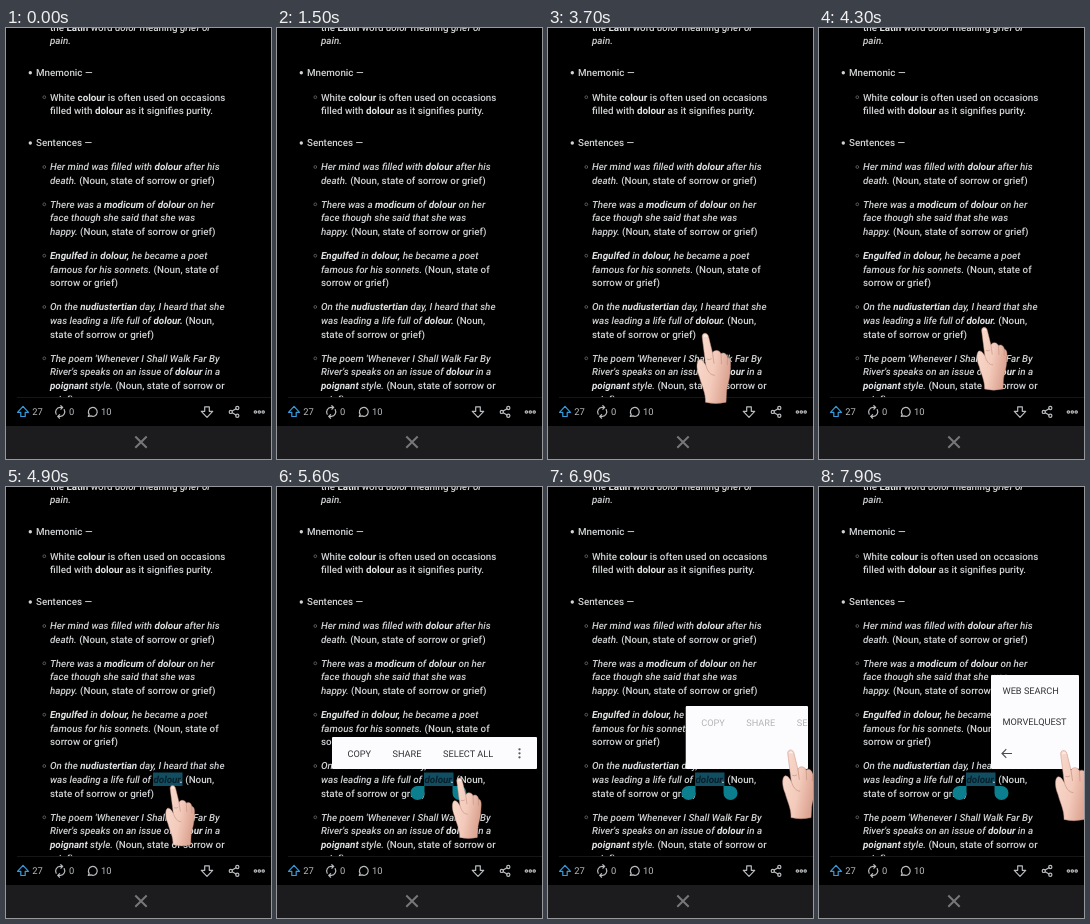
Animation of 265 by 431 pixels, one loop 8 s. Source, as an HTML page:

```html
<!DOCTYPE html>
<html lang="en">
<head>
<meta charset="utf-8">
<title>Text selection menu</title>
<style>
  html, body { margin: 0; width: 100%; height: 100%; overflow: hidden; background: #000; }
  svg { display: block; width: 100vw; height: 100vh; }
  text { font-family: Roboto, "Noto Sans", sans-serif; text-rendering: geometricPrecision; white-space: pre; }
  #page text { font-size: 9.8px; font-weight: 500; fill: #cfd1d3; }
  #page .bold { font-weight: 700; fill: #e0e2e4; }
  #page .italic { font-style: italic; }
  .icon { fill: none; stroke: #b9bcbf; stroke-width: 1.2; stroke-linejoin: round; stroke-linecap: round; }
  .count { font-size: 9.4px; fill: #b9bcbf; }
  #popup text { font-size: 9.2px; fill: #303134; }
</style>
</head>
<body>
<svg viewBox="0 0 265 431" preserveAspectRatio="none">
  <defs>
    <linearGradient id="skin" x1="0" x2="1" y1="0" y2=".4">
      <stop offset="0" stop-color="#f9dccf"/>
      <stop offset=".6" stop-color="#f3cabb"/>
      <stop offset="1" stop-color="#dda593"/>
    </linearGradient>
    <clipPath id="popupClip"><rect id="clipBox" rx="1"/></clipPath>
  </defs>
  <rect width="265" height="431"/>
  <rect id="selection" x="147" y="285.5" width="29.5" height="13.5" fill="#114e62"/>
  <g id="page"></g>

  <rect y="369.5" width="265" height="29"/>
  <path d="M11 369.5H265" stroke="#1b1c1d" stroke-width=".8"/>
  <path class="icon" style="stroke:#359bdc" d="M17 378.3L22.5 384.3H19.2V388.5H14.8V384.3H11.5Z"/>
  <text class="count" x="26.3" y="387">27</text>
  <g class="icon">
    <path d="M50.2 386.2A4.6 4.6 0 0 1 54 379.4H56.6M54.8 377.6L56.7 379.4L54.8 381.2"/>
    <path d="M58.2 381.6A4.6 4.6 0 0 1 54.4 388.4H51.8M53.6 386.6L51.7 388.4L53.6 390.2"/>
    <path d="M82.3 388.3L83.2 386.4A4.4 4.4 0 1 1 85 387.9Z"/>
    <path d="M201 389.3L195.3 383.3H198.7V378.8H203.3V383.3H206.7Z"/>
    <path d="M226.2 383L230 380.7M226.2 384.8L230 387"/>
    <circle cx="224.8" cy="383.9" r="1.6"/><circle cx="231.3" cy="380" r="1.6"/><circle cx="231.3" cy="387.8" r="1.6"/>
    <circle cx="249.4" cy="384" r="1.2"/><circle cx="253.3" cy="384" r="1.2"/><circle cx="257.2" cy="384" r="1.2"/>
  </g>
  <text class="count" x="63" y="387">0</text>
  <text class="count" x="95" y="387">10</text>

  <rect y="398" width="265" height="33" fill="#1c1b1e"/>
  <path d="M129.3 408.5L140.7 419.7M140.7 408.5L129.3 419.7" stroke="#77767a" stroke-width="2"/>

  <g id="handles" fill="#0c7f8f">
    <path d="M147.5 299V306A7 7 0 1 1 140.5 299Z"/>
    <path d="M175.5 299V306A7 7 0 1 0 182.5 299Z"/>
  </g>

  <g id="popup" clip-path="url(#popupClip)">
    <rect width="265" height="431" fill="#fcfbfe"/>
    <g id="mainPanel">
      <text x="15.5" y="20">COPY</text>
      <text x="60.5" y="20">SHARE</text>
      <text x="111" y="20">SELECT ALL</text>
    </g>
    <g id="dots" fill="#55565a">
      <circle cx="242.5" cy="262.3" r="1.15"/><circle cx="242.5" cy="266.3" r="1.15"/><circle cx="242.5" cy="270.3" r="1.15"/>
    </g>
    <g id="overflow">
      <text x="183.5" y="207">WEB SEARCH</text>
      <text x="183.5" y="238.3">MORVELQUEST</text>
      <path d="M193 266.5H183M187.3 262.2L183 266.5L187.3 270.8" fill="none" stroke="#4a4b4f" stroke-width="1.1"/>
    </g>
  </g>

  <g id="hand">
    <path fill="url(#skin)" stroke="#c08f7f" stroke-width=".5" stroke-linejoin="round"
      d="M-3.3 4C-4-.8 2.2-1.8 3.2 4L7 19.5C9 16 14 16.5 15.5 20.5C18 18.5 21.5 20.5 22 24.5C25 25 25.5 29 24.8 35C24.5 47 21.5 52 21 59L20.5 69Q10 71.5 0 69C.5 60-4 52-6 44C-9 37-9.5 29-6.5 26.5C-3.5 25.5-1.5 29 .3 32Z"/>
    <path fill="none" stroke="#c4917f" stroke-width=".7" stroke-linecap="round"
      d="M7 19.5L8.5 30M15.5 20.5L16 30.5M22 24.5L21.8 31.5M.3 32C2 38 5 42 9 42M1.7 26Q3.7 27 5.7 25.6"/>
    <path fill="none" stroke="#fff1ea" stroke-width="1.3" stroke-linecap="round" d="M-1.2 3Q0 1.4 1.1 3"/>
  </g>
</svg>
<script>
const LOOP = 8000;
const $ = id => document.getElementById(id);
const svgNode = (tag, attrs, parent) => {
  const node = document.createElementNS("http://www.w3.org/2000/svg", tag);
  for (const key in attrs) node.setAttribute(key, attrs[key]);
  return parent.appendChild(node);
};

// * toggles bold, _ toggles italic, # marks the selectable word
function addLine(x, y, markup) {
  const line = svgNode("text", { x, y }, $("page"));
  const on = { "*": false, "_": false, "#": false };
  for (const part of markup.split(/([*_#])/)) {
    if (part in on) { on[part] = !on[part]; continue; }
    if (!part) continue;
    const names = [on["*"] && "bold", on["_"] && "italic"].filter(Boolean).join(" ");
    const span = svgNode("tspan", { class: names }, line);
    span.textContent = part;
    if (on["#"]) span.id = "word";
  }
}
function addHeading(y, label) {
  svgNode("circle", { cx: 24.3, cy: y - 3.3, r: 1.7, fill: "#d2d4d6" }, $("page"));
  addLine(30, y, label);
}
function addItem(y, ...lines) {
  svgNode("circle", { cx: 38.3, cy: y - 3.3, r: 1.4, fill: "none", stroke: "#77797b", "stroke-width": .7 }, $("page"));
  lines.forEach((line, i) => addLine(44, y + i * 13.7, line));
}

addLine(44, 2.6, "the *Latin* word _dolor_ meaning _grief or_");
addLine(44, 16.2, "_pain._");
addHeading(48, "Mnemonic —");
addItem(72.5, "White *colour* is often used on occasions", "filled with *dolour* as it signifies purity.");
addHeading(118.3, "Sentences —");
addItem(142.3, "_Her mind was filled with *dolour* after his_", "_death._ (Noun, state of sorrow or grief)");
addItem(179.6, "_There was a *modicum* of *dolour* on her_", "_face though she said that she was_", "_happy._ (Noun, state of sorrow or grief)");
addItem(231, "_*Engulfed* in *dolour,* he became a poet_", "_famous for his sonnets._ (Noun, state of", "sorrow or grief)");
addItem(282.3, "_On the *nudiustertian* day, I heard that she_", "_was leading a life full of *#dolour#.*_ (Noun,", "state of sorrow or grief)");
addItem(333.6, "_The poem 'Whenever I Shall Walk Far By_", "_River's speaks on an issue of *dolour* in a_", "_*poignant* style._ (Noun, state of sorrow or", "grief)");

const clamp = v => Math.min(1, Math.max(0, v));
const progress = (t, from, to) => clamp((t - from) / (to - from));
const ease = p => (1 - Math.cos(Math.PI * p)) / 2;
const mix = (a, b, p) => a + (b - a) * p;

// Eased interpolation through [time, value] pairs
function track(t, keys) {
  let [lastTime, lastValue] = keys[0];
  for (const [time, value] of keys) {
    if (t < time) return mix(lastValue, value, ease(progress(t, lastTime, time)));
    [lastTime, lastValue] = [time, value];
  }
  return lastValue;
}

const handX = [[2700, 158.3], [3700, 157.5], [4500, 167], [5300, 167], [6300, 243], [7100, 243], [7500, 245]];
const handY = [[2700, 300], [3600, 305.5], [4500, 298.5], [5300, 298.5], [6300, 262.5], [7500, 263.5]];
const handScale = [[3900, 1], [4500, .86], [5600, .86], [6300, 1], [6450, 1], [6650, .87], [6900, .98], [7100, 1]];

function render(t) {
  $("hand").setAttribute("transform",
    `translate(${track(t, handX)} ${track(t, handY)}) scale(${track(t, handScale)})`);
  $("hand").setAttribute("opacity", progress(t, 2100, 2450));

  const selected = t >= 4600;
  $("selection").setAttribute("opacity", selected ? 1 : 0);
  $("word").style.fill = selected ? "#08202a" : "";
  $("handles").setAttribute("opacity", t >= 5200 ? 1 : 0);
  $("popup").setAttribute("opacity", progress(t, 5150, 5350));

  const open = progress(t, 6700, 7100);
  const left = mix(55, 172, Math.sin(open * Math.PI / 2));
  const top = mix(250, 188, ease(open));
  const box = { x: left, y: top, width: 260 - left, height: 282 - top };
  for (const key in box) $("clipBox").setAttribute(key, box[key]);
  $("mainPanel").setAttribute("transform", `translate(${left} ${top})`);
  $("mainPanel").setAttribute("opacity", clamp(1 - open * 1.3));
  $("dots").setAttribute("opacity", clamp(1 - open * 2));
  $("overflow").setAttribute("opacity", progress(open, .6, 1));
}

let start;
function tick(now) {
  start ??= now;
  render((now - start) % LOOP);
  requestAnimationFrame(tick);
}
render(0);
requestAnimationFrame(tick);
</script>
</body>
</html>
```
